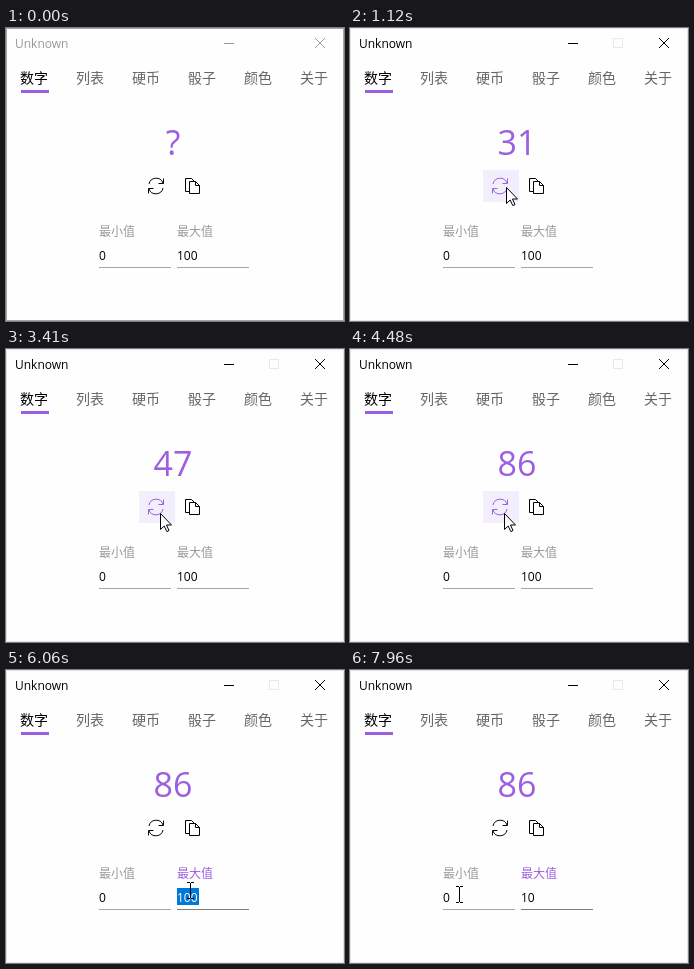
Recreate the animation shown at these times as an HTML page. Size 338 px wide and 293 px high, loop 8 s.

```html
<!DOCTYPE html>
<html lang="zh-CN">
<meta charset="utf-8">
<title>Random picker</title>
<style>
  html, body { margin: 0; width: 100%; height: 100%; overflow: hidden; background: #fff; }
  svg { display: block; font: 12px "Open Sans", "Noto Sans CJK SC", "Noto Sans CJK", sans-serif; }
  .cjk { font-family: "Noto Sans CJK SC", "Noto Sans CJK", sans-serif; }
  .line { fill: none; stroke: #000; stroke-width: 1; }
  .crisp { shape-rendering: crispEdges; }
</style>
<svg width="338" height="293" viewBox="0 0 338 293">
  <defs><clipPath id="selClip"><rect id="selMask" y="218" height="17"/></clipPath></defs>
  <rect width="338" height="293" fill="#fefefe"/>
  <rect id="border" class="crisp" x=".5" y=".5" width="337" height="292" fill="none"/>

  <text id="title" x="9" y="20">Unknown</text>
  <path id="minimize" class="line crisp" d="M218 15.5H228"/>
  <rect id="maximize" class="crisp" x="263.5" y="10.5" width="9" height="9" fill="none" stroke="#e8e8e8"/>
  <path id="close" class="line" d="M309 10L319 20M319 10L309 20"/>

  <g id="tabs" class="cjk" font-size="14"></g>
  <rect x="15" y="62" width="28" height="3" fill="#9b5fe0"/>

  <text id="number" x="167" y="127" font-size="34" text-anchor="middle" fill="#9b5fe0"></text>
  <rect id="hover" x="133" y="142" width="36" height="32" fill="#f3eefb"/>
  <path id="sync" class="line" d="M143 156A7.3 7.3 0 0 1 157 155M157.5 150.5V155.5H152.5M157 160A7.3 7.3 0 0 1 143 161M142.5 165.5V160.5H147.5"/>
  <path class="line" d="M183 163.5H179.5V150.5H185.5L188.5 153.5M183.5 153.5H189.5L193.5 157.5V165.5H183.5ZM189.5 153.5V157.5H193.5"/>

  <text class="cjk" x="93" y="208" fill="#999">最小值</text>
  <text id="maxLabel" class="cjk" x="171" y="208">最大值</text>
  <text x="93" y="232">0</text>
  <text id="maxText" x="171" y="232"></text>
  <rect id="selection" y="218" height="17" fill="#0078d7"/>
  <g clip-path="url(#selClip)"><text x="171" y="232" fill="#fff">100</text></g>
  <rect id="caret" x="185" y="218" width="1" height="17"/>
  <path class="crisp" d="M93 239.5H165" stroke="#a5a5a5"/>
  <path id="maxLine" class="crisp" d="M171 239.5H243"/>

  <g id="pointer">
    <circle id="press" r="12" fill="#ff0" fill-opacity=".6"/>
    <path id="arrow" d="M.5 .5V16.5L4.2 13 6.8 18.6 9 17.6 6.5 12H11.5Z" fill="#fff" stroke="#000"/>
    <path id="beam" class="line crisp" d="M-3 -7.5H0M1 -7.5H4M.5 -7V8M-3 8.5H0M1 8.5H4"/>
  </g>
</svg>
<script>
  const LOOP = 8000, PURPLE = '#9b5fe0';
  const ui = {};
  document.querySelectorAll('[id]').forEach(el => ui[el.id] = el);

  ui.tabs.innerHTML = ['数字', '列表', '硬币', '骰子', '颜色', '关于'].map((name, i) =>
    `<text x="${14 + 56 * i}" y="55" fill="${i ? '#666' : '#000'}">${name}</text>`).join('');

  // Pointer keys: time, x, y. A repeated time is a jump.
  const path = [
    [410, 325, 285], [600, 235, 220], [830, 156, 159], [1580, 156, 159], [1710, 154, 164],
    [4910, 154, 164], [5060, 185, 196], [5220, 222, 233], [5550, 222, 233], [5550, 185, 233],
    [5600, 185, 233], [5650, 150, 240], [5780, 73, 253], [5930, 73, 253], [6080, 200, 215],
    [6170, 307, 178], [6210, 350, 172], [7320, 350, 189], [7370, 314, 193], [7500, 200, 215],
    [7640, 120, 226], [7730, 99, 228], [7910, 99, 228], [7960, 109, 224], [LOOP, 109, 224]
  ];
  const presses = [[950, 1100], [2090, 2240], [3130, 3410], [4250, 4480], [5370, 5930]];
  const numbers = [[0, '?'], [1070, '31'], [2190, '69'], [3360, '47'], [4430, '86']];

  const within = (v, a, b) => v >= a && v < b;
  const show = (el, on) => el.setAttribute('visibility', on ? 'inherit' : 'hidden');
  const set = (el, attrs) => { for (const k in attrs) el.setAttribute(k, attrs[k]); };

  function pointerAt(t) {
    if (t < path[0][0]) return [400, 0];
    const i = path.findIndex(key => key[0] > t);
    const [t0, x0, y0] = path[i - 1], [t1, x1, y1] = path[i];
    const k = (t - t0) / (t1 - t0);
    return [Math.round(x0 + (x1 - x0) * k), Math.round(y0 + (y1 - y0) * k)];
  }

  function draw(t) {
    const [x, y] = pointerAt(t);
    const active = t >= 950, focused = t >= 5370;
    const pressed = presses.some(([a, b]) => within(t, a, b));
    const hovering = within(x, 133, 169) && within(y, 142, 174);
    const dragging = focused && pressed;
    const overField = within(y, 210, 240) && (within(x, 93, 165) || within(x, 171, 243));

    ui.border.setAttribute('stroke', active ? '#e3e3e3' : '#a5a5a5');
    ui.title.setAttribute('fill', active ? '#000' : '#999');
    ui.minimize.style.stroke = ui.close.style.stroke = active ? '#000' : '#999';
    show(ui.maximize, active);

    ui.number.textContent = numbers.filter(n => n[0] <= t).pop()[1];
    show(ui.hover, hovering);
    ui.sync.style.stroke = hovering ? PURPLE : '#000';

    ui.maxLabel.setAttribute('fill', focused ? PURPLE : '#999');
    ui.maxLine.setAttribute('stroke', focused ? '#7c7c7c' : '#a5a5a5');
    ui.maxText.textContent = t < 6710 ? '100' : t < 6760 ? '1' : '10';

    const selecting = within(t, 5550, 6710);
    const left = t < 5600 ? 185 : 171;
    const range = { x: left, width: selecting ? 193 - left : 0 };
    set(ui.selection, range);
    set(ui.selMask, range);
    show(ui.caret, within(t, 7190, 7725));

    set(ui.pointer, { transform: `translate(${x} ${y})` });
    show(ui.press, pressed);
    show(ui.beam, overField || dragging);
    show(ui.arrow, !overField && !dragging);
  }

  function frame() {
    draw(performance.now() % LOOP);
    requestAnimationFrame(frame);
  }
  frame();
</script>
</html>
```
